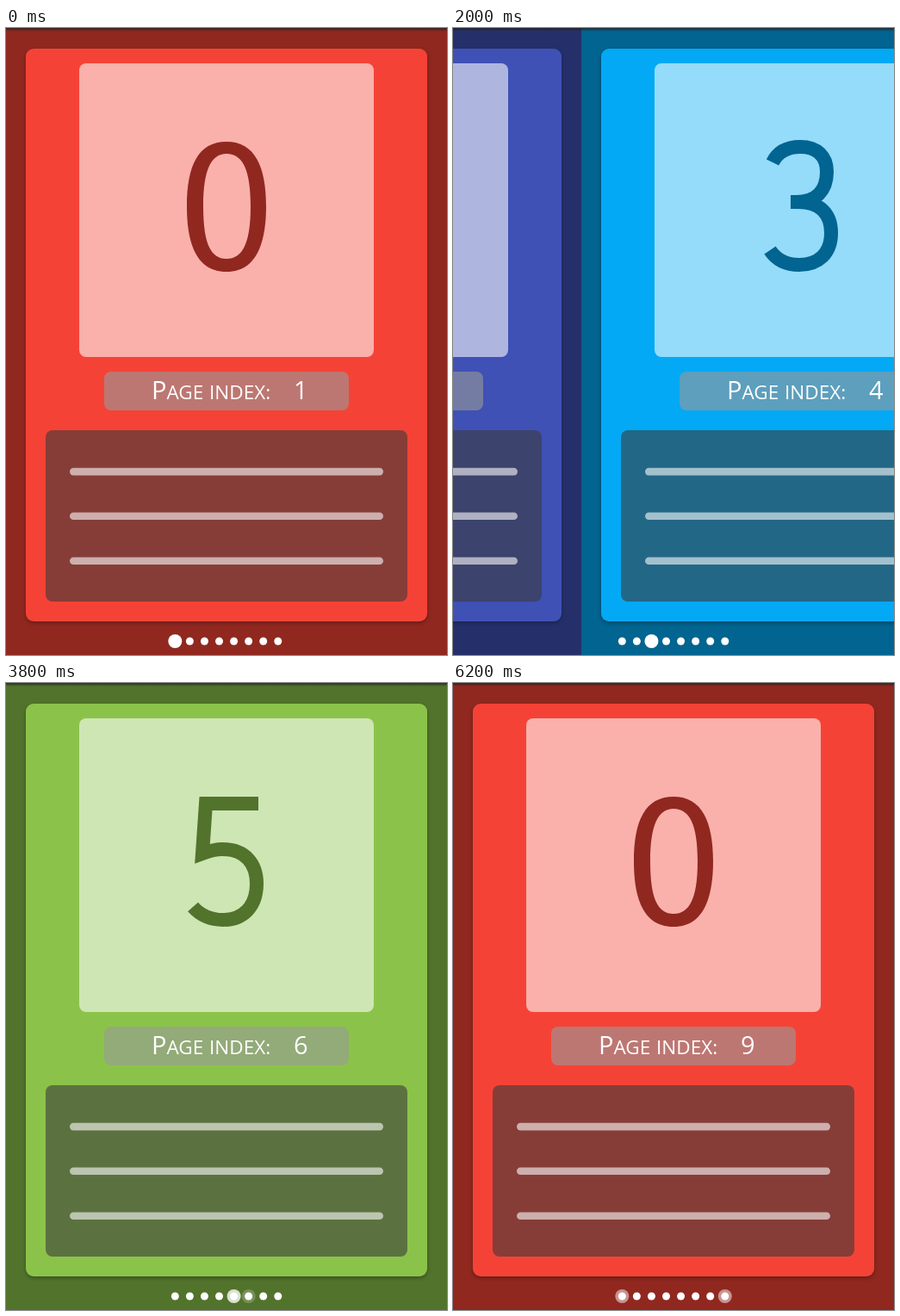
An HTML page that plays this animation: 512x728 px, repeating every 6300 ms.

```html
<!DOCTYPE html>
<html lang="en">
<head>
<meta charset="utf-8">
<title>Looping pager</title>
<style>
  html, body { margin: 0; width: 100%; height: 100%; overflow: hidden; background: #000; }
  svg { display: block; width: 512px; height: 728px; }
  text { font: 29px "Open Sans", "Noto Sans", sans-serif; fill: #fff; }
  .small { font-size: 22.5px; }
  .card { filter: drop-shadow(0 2px 2px rgba(0, 0, 0, .3)); }
</style>
</head>
<body>
<svg id="stage" viewBox="0 0 512 728">
  <defs>
    <linearGradient id="edge" x2="0" y2="1">
      <stop stop-color="#222" stop-opacity=".85"/>
      <stop offset="1" stop-color="#222" stop-opacity="0"/>
    </linearGradient>
  </defs>
  <g id="pages"></g>
  <rect width="512" height="4" fill="url(#edge)"/>
  <g id="dots" fill="#fff"></g>
</svg>
<script>
const LOOP = 6300, STEP = 100, WIDTH = 512;
const SLIDE = 350, FADE = 140;
const swipes = [290, 1053, 1777, 2600, 3420, 4239, 5035, 5780];

const colors = [
  [244, 67, 54], [156, 39, 176], [63, 81, 181], [3, 169, 244],
  [0, 150, 136], [139, 195, 74], [255, 231, 59], [255, 87, 34]
];

// Closed outlines are filled, open ones are pen strokes.
const numerals = [
  'M256 132C289 132 302 161 302 207S289 283 256 283S210 254 210 207S223 132 256 132Z' +
  'M256 146C275 146 284 165 284 207S275 268 256 268S229 249 229 207S238 146 256 146Z',
  'M253 132H272V265H295V280H227V265H255V149L226 166L218 153Z',
  'M218 156C226 145 238 139 253 139C274 139 285 152 285 171C285 197 268 216 226 272H296',
  'M222 156C228 144 239 138 254 138C274 138 285 149 285 167C285 189 272 202 250 202H243' +
  'H252C276 202 290 215 290 238C290 262 275 275 253 275C238 275 227 270 219 258',
  'M244 130L261 134L231 236H264V210L268 187H281V236H302V251H281V280H264V251H214V236Z',
  'M293 140H232L228 198C236 195 243 193 251 193C278 193 291 210 291 233' +
  'C291 260 275 275 252 275C237 275 226 270 217 260',
  'M291.5 135C253 147 225 175 225 222C225 259 236 275 258 275C281 275 292 259 292 234' +
  'C292 208 281 193 264 193C250 193 237 200 229 213',
  'M219 132H299V148L246 280H227L282 147H219Z'
];

const rgb = color => `rgb(${color.map(Math.round)})`;
const box = (x, y, w, h, r, fill, extra = '') =>
  `<rect x="${x}" y="${y}" width="${w}" height="${h}" rx="${r}" fill="${fill}" ${extra}/>`;

function numeral(n, color) {
  const paint = numerals[n].endsWith('Z')
    ? `fill="${color}" fill-rule="evenodd"`
    : `fill="none" stroke="${color}" stroke-width="16"`;
  return `<path role="img" aria-label="${n}" d="${numerals[n]}" ${paint}/>`;
}

function page(index) {
  const n = index % colors.length;
  const dark = rgb(colors[n].map(c => c * .59));
  const lines = [510.8, 562.4, 614.4].map(y => box(74, y, 364, 8.6, 4.3, 'rgba(255,255,255,.59)'));
  return `<g transform="translate(${index * WIDTH})">
    ${box(0, 0, WIDTH, 728, 0, dark, 'shape-rendering="crispEdges"')}
    ${box(23, 24, 466, 665, 9, rgb(colors[n]), 'class="card"')}
    ${box(85, 41, 342, 341, 8, 'rgba(255,255,255,.58)')}
    ${numeral(n, dark)}
    ${box(114, 399, 284, 45, 8, 'rgba(153,153,153,.6)')}
    <text x="169" y="431">P<tspan class="small">AGE</tspan></text>
    <text x="236" y="431" class="small">INDEX:</text>
    <text x="334" y="431">${index + 1}</text>
    ${box(46, 467, 420, 199, 8, 'rgba(59,59,59,.59)')}
    ${lines.join('')}
  </g>`;
}

const pages = document.getElementById('pages');
const dots = document.getElementById('dots');
pages.innerHTML = Array.from({ length: 9 }, (_, i) => page(i)).join('');
dots.innerHTML = colors.map((_, i) => {
  const at = `cx="${196.3 + i * 17.07}" cy="712"`;
  return `<circle ${at} r="4.5"/><circle class="big" ${at} r="8"/>`;
}).join('');
const bigDots = dots.querySelectorAll('.big');

const progress = (t, start, duration) => Math.min(1, Math.max(0, (t - start) / duration));
const ease = u => .5 - .5 * Math.cos(Math.PI * u);

function draw(now) {
  const t = Math.floor((now + 5) / STEP) * STEP % LOOP;
  let scroll = 0, active = 0;
  for (const start of swipes) {
    scroll += ease(progress(t, start, SLIDE));
    active += progress(t, start + SLIDE, FADE);
  }
  pages.setAttribute('transform', `translate(${Math.round(-scroll * WIDTH)})`);
  bigDots.forEach((dot, i) => {
    const gap = Math.abs(active - i);
    dot.setAttribute('opacity', Math.max(0, 1 - Math.min(gap, bigDots.length - gap)));
  });
  requestAnimationFrame(draw);
}
draw(0);
</script>
</body>
</html>
```
